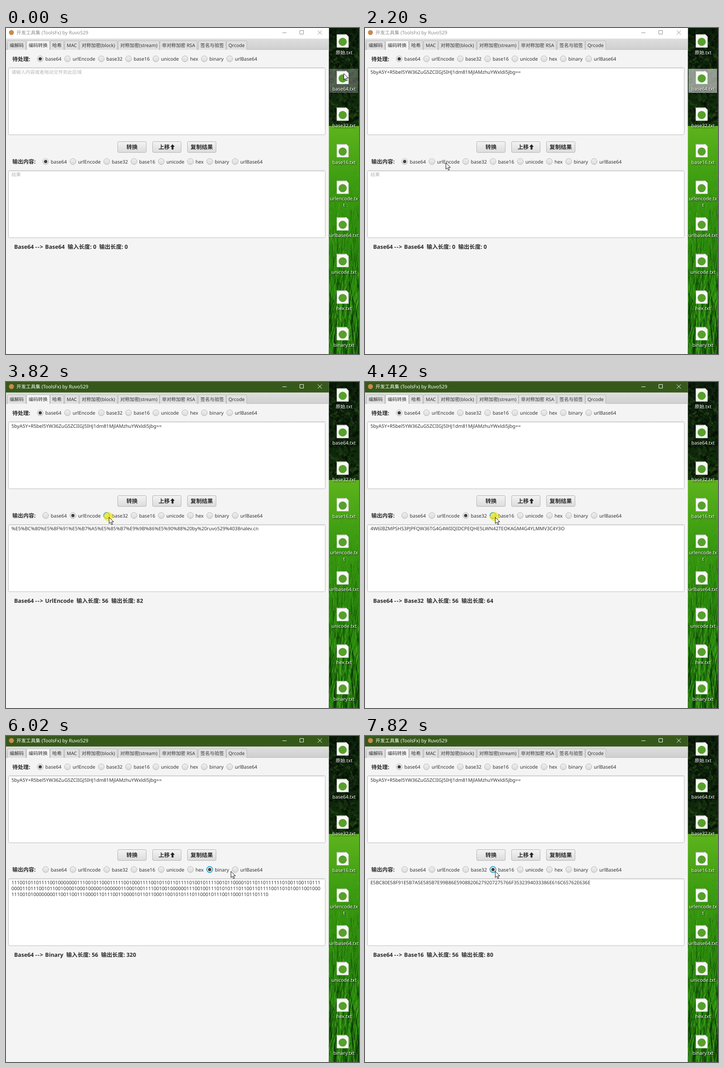
An HTML page with a canvas that plays this animation: 779 px wide and 719 px high, repeating every 8000 ms.

```html
<!DOCTYPE html>
<html lang="zh">
<head>
<meta charset="utf-8">
<title>开发工具集</title>
<style>
html, body { margin: 0; width: 100%; height: 100%; overflow: hidden; background: #f4f4f4; }
canvas, svg { position: absolute; left: 0; top: 0; display: block; }
text {
  font: 10.56px "Noto Sans", "Open Sans", "Noto Sans CJK SC", "Noto Sans CJK", sans-serif;
  fill: #333; white-space: pre; text-rendering: geometricPrecision;
}
.tab { font-size: 10.4px; }
.bold { font-size: 12.35px; font-weight: 700; fill: #2b2b2b; }
.cap { font-size: 12px; }
.mid { text-anchor: middle; }
.hint { font-size: 10.35px; fill: #b4b4b4; }
.icon { font-size: 10.5px; fill: #fff; text-anchor: middle; filter: drop-shadow(1px 1px 1px #000); }
#bar { fill: #fff; }
#title { fill: #8c8c8c; }
#ctl { fill: none; stroke: #8c8c8c; }
.active #bar { fill: #36591b; }
.active #title { fill: #fff; }
.active #ctl { stroke: #fff; }
</style>
</head>
<body>
<canvas id="wall" width="779" height="719"></canvas>
<svg id="app" width="779" height="719" viewBox="0 0 779 719">
  <defs>
    <linearGradient id="btn" x2="0" y2="1"><stop stop-color="#f3f3f3"/><stop offset="1" stop-color="#dcdcdc"/></linearGradient>
    <linearGradient id="dot" x2="0" y2="1"><stop stop-color="#f0f0f0"/><stop offset="1" stop-color="#dadada"/></linearGradient>
    <linearGradient id="tabs" x2="0" y2="1"><stop stop-color="#dedede"/><stop offset="1" stop-color="#cfcfcf"/></linearGradient>
    <linearGradient id="inset" x2="0" y2="1"><stop stop-color="#e4e4e4"/><stop offset="1" stop-color="#fff"/></linearGradient>
  </defs>
  <text id="probe" visibility="hidden"></text>
  <g id="ui"></g>
  <circle id="glow" r="10" fill="#f2e500" fill-opacity=".68"/>
  <path id="cursor" d="M.5 .5V14.2L3.7 11.2L6 16.6L8.3 15.6L6 10.4H10.4Z" fill="#fff" stroke="#111"/>
</svg>
<script>
const $ = id => document.getElementById(id);
const LOOP = 8000, DROP = 800;

const names = ['base64', 'urlEncode', 'base32', 'base16', 'unicode', 'hex', 'binary', 'urlBase64'];
const labels = ['Base64', 'UrlEncode', 'Base32', 'Base16', 'Unicode', 'Hex', 'Binary', 'Base64Safe'];
const tabNames = ['编解码', '编码转换', '哈希', 'MAC', '对称加密(block)', '对称加密(stream)',
  '非对称加密 RSA', '签名与验签', 'Qrcode'];
const files = ['原始.txt', 'base64.txt', 'base32.txt', 'base16.txt', 'urlencode.tx|t',
  'urlbase64.txt', 'unicode.txt', 'hex.txt', 'binary.txt'];

// Encoders
const plain = '开发工具集合 by ruvo529@38nalev.cn';
const bytes = [...new TextEncoder().encode(plain)];
const join = (radix, pad) => bytes.map(b => b.toString(radix).padStart(pad, '0')).join('');
const bits = join(2, 8), hex = join(16, 2);
const base64 = btoa(String.fromCharCode(...bytes));
const base32 = bits.match(/.{5}/g).map(b => 'ABCDEFGHIJKLMNOPQRSTUVWXYZ234567'[parseInt(b, 2)]).join('');
const unicode = [...plain].map(c => '\\u' + c.charCodeAt(0).toString(16)).join('');
const outputs = [base64, encodeURIComponent(plain), base32, hex.toUpperCase(),
  unicode, hex, bits, base64.replace(/\+/g, '-').replace(/\//g, '_')];

// Layout
function width(s, cls = '') {
  $('probe').setAttribute('class', cls);
  $('probe').textContent = s;
  return $('probe').getComputedTextLength();
}
// Left edge of each item in a row of texts
function flow(list, x, gap, cls) {
  return list.map(s => {
    const left = x;
    x += width(s, cls) + gap;
    return left;
  });
}
const radioX = flow(names, 75.5, 24.7);
const tabX = flow(tabNames, 3, 10.8, 'tab');

const text = (x, y, s, cls = '', id = '') => `<text x="${x}" y="${y}" class="${cls}" id="${id}">${s}</text>`;
const rect = (x, y, w, h, attrs) => `<rect x="${x}" y="${y}" width="${w}" height="${h}" ${attrs}/>`;

const tab = (s, i) => {
  const x = Math.round(tabX[i]), w = Math.round(width(s, 'tab') + 9);
  return `<path d="M${x + .5} 48V30q0-2 2-2h${w - 4}q2 0 2 2V48" fill="${i === 1 ? '#f4f4f4' : '#e0e0e0'}" stroke="#b9b9b9"/>`
    + text(x + 5, 42, s, 'tab');
};

const radios = (row, shift, y) => names.map((s, i) => {
  const x = radioX[i] + shift;
  return `<circle id="${row}ring${i}" cx="${x}" cy="${y}" r="6.6" fill="url(#dot)" stroke="#b5b5b5"/>`
    + `<circle id="${row}dot${i}" cx="${x}" cy="${y}" r="3.5" fill="#3c3f3c"/>`
    + text(x + 11.3, y + 4, s);
}).join('');

const area = y => rect(5.5, y + .5, 699, 148, 'rx="2" fill="#fff" stroke="#bdbdbd"')
  + rect(6, y + 1, 698, 3, 'fill="url(#inset)"');

const button = (s, i) => {
  const x = 246 + i * 77;
  return rect(x + .5, 250.5, 63, 24, 'rx="2.5" fill="url(#btn)" stroke="#b3b3b3"')
    + text(x + (i === 1 ? 26 : 32), 267, s, 'bold mid');
};

const file = (s, i) => {
  const y = i * 80.7;
  return `<path d="M730 ${y + 14}H751L756 ${y + 19}V${y + 43}H730Z" fill="#f7f8f4" stroke="#aeb5a6" stroke-width=".7"/>`
    + `<path d="M732 ${y + 14.5}H750" stroke="#777" stroke-width="2" stroke-dasharray="1 2"/>`
    + `<circle cx="743" cy="${y + 30.5}" r="9" fill="#57a02c"/>`
    + s.split('|').map((line, k) => text(746, y + 57.5 + k * 14, line, 'icon')).join('');
};

$('ui').innerHTML = rect(0, 0, 712.5, 719, 'fill="#f4f4f4"')
  + rect(0, 0, 712.5, 23.5, 'id="bar"')
  + '<circle cx="12" cy="10" r="5.5" fill="#c98a4b"/>'
  + text(23, 13.7, '开发工具集 (ToolsFx) by Ruvo529', '', 'title')
  + '<path id="ctl" d="M610 10.5h9M648.5 5.5h8v8h-8zM688 5.5l9 9M697 5.5l-9 9"/>'
  + rect(0, 23.5, 712.5, 24.5, 'fill="url(#tabs)"')
  + '<path d="M0 47.5H712" stroke="#b9b9b9"/>'
  + tabNames.map(tab).join('')
  + text(14, 72.5, '待处理:', 'bold cap') + radios('a', 0, 68)
  + area(87) + area(314)
  + ['转换', '上移', '复制结果'].map(button).join('')
  + '<path d="M367.5 256.5l5 5.5h-3v6h-4v-6h-3z" fill="#222"/>'
  + text(14, 299, '输出内容:', 'bold cap') + radios('b', 12, 294.5)
  + text(12, 100.5, '', '', 'input')
  + [0, 1, 2].map(i => text(12, 327 + i * 13, '', '', 'out' + i)).join('')
  + text(18, 486.5, 'Base64 <tspan letter-spacing="1.2">--&gt;</tspan> <tspan id="status"></tspan>', 'bold')
  + rect(714.5, 90.5, 62, 52, 'id="tile" fill="#fff" stroke="#fff"')
  + files.map(file).join('');

// Wallpaper: dark trees above a meadow
function paintWall() {
  const c = $('wall').getContext('2d'), left = 712, horizon = 216;
  let seed = 11;
  const rnd = () => (seed = seed * 16807 % 2147483647) / 2147483647;
  const fill = (y, h, ...colors) => {
    const g = c.createLinearGradient(0, y, 0, y + h);
    colors.forEach((col, i) => g.addColorStop(i / (colors.length - 1), col));
    c.fillStyle = g;
    c.fillRect(left, y, 67, h);
  };
  fill(0, horizon, '#0a1c0a', '#0d220b', '#12300c');
  fill(horizon, 503, '#5db31c', '#3c9c10', '#2b880c', '#237a0b', '#1c680a');
  c.beginPath();
  c.rect(left, 0, 67, 719);
  c.clip();
  for (let i = 0; i < 420; i++) {
    const y = rnd() * (horizon - 8), light = Math.sin(y / 40) ** 2;
    c.fillStyle = rnd() < .55 ? 'rgba(2,8,2,.5)' : `rgba(50,90,28,${.15 + light * .25})`;
    c.beginPath();
    c.ellipse(left + rnd() * 67, y, 1 + rnd() * 5, 1 + rnd() * 2, rnd() * 3, 0, 7);
    c.fill();
  }
  for (let i = 0; i < 900; i++) {
    const depth = Math.sqrt(rnd()), y = horizon + 6 + depth * 530, x = left - 7 + rnd() * 80;
    const len = 3 + depth * depth * 85 * (.4 + rnd()), lean = (rnd() - .4) * len * .5;
    const kind = rnd();
    c.strokeStyle = kind < .48 ? `rgba(8,54,4,${.1 + depth * .5})`
      : kind < .85 ? 'rgba(54,166,20,.5)' : 'rgba(112,200,56,.4)';
    c.lineWidth = .6 + depth * 1.8 * rnd();
    c.beginPath();
    c.moveTo(x, y);
    c.quadraticCurveTo(x + lean * .2, y - len * .6, x + lean, Math.max(horizon + 3, y - len));
    c.stroke();
  }
}

// Radio clicks: press time, index, how long the button is held
const clicks = [[2600, 1, 200], [3820, 2, 200], [4420, 3, 200], [4820, 4, 200], [5420, 5, 0],
  [5620, 6, 200], [6220, 7, 200], [7220, 1, 0], [7420, 2, 200], [7820, 3, 0]]
  .map(([down, index, hold]) => ({ down, index, up: down + hold }));

// Pointer moves: drag the file in, drop it, then travel from radio to radio
const move = (from, to, x, y) => ({ from, to, x, y });
const moves = [move(0, DROP, 212, 120), move(1000, 1200, 221, 141), move(1600, 2200, 178, 297),
  ...clicks.map((k, i) => move(i ? clicks[i - 1].down : 2400, k.down, radioX[k.index] + 17, 297.5))];

const ease = p => p * p * (3 - 2 * p);

function pointer(t) {
  let x = 745, y = 100;
  for (const m of moves) {
    const p = ease(Math.min(1, Math.max(0, (t - m.from) / (m.to - m.from))));
    x += (m.x - x) * p;
    y += (m.y - y) * p;
  }
  return [Math.round(x), Math.round(y)];
}

function snap(t) {
  const slip = t < 3820 ? 0 : 20;
  const s = Math.floor((t - slip) / 200) * 200 + slip;
  return s === 3800 ? 3600 : s;
}

function choose(row, sel, focus) {
  names.forEach((_, i) => {
    $(row + 'dot' + i).style.display = i === sel ? '' : 'none';
    const ring = $(row + 'ring' + i);
    ring.setAttribute('stroke', i === focus ? '#2a9fcb' : '#b5b5b5');
    ring.setAttribute('stroke-width', i === focus ? 1.6 : 1);
  });
}

function render(t) {
  const [x, y] = pointer(t);
  const press = clicks.filter(k => k.down <= t).pop();
  const pick = clicks.filter(k => k.up <= t).pop();
  const sel = pick ? pick.index : 0;
  const loaded = t >= DROP;

  $('app').classList.toggle('active', !!press);
  $('cursor').setAttribute('transform', `translate(${x} ${y})`);
  $('glow').setAttribute('cx', x - 1);
  $('glow').setAttribute('cy', y - 1);
  $('glow').style.display = press && t < press.up ? '' : 'none';
  $('tile').style.opacity = press ? 0 : t < 200 ? .27 : .55;

  $('input').textContent = loaded ? base64 : '请输入内容或者拖动文件到此区域';
  $('input').setAttribute('class', loaded ? '' : 'hint');
  choose('b', sel, press ? press.index : -1);

  const out = pick ? outputs[sel] : '结果';
  const n = Math.floor(out.length * 684 / width(out));
  for (let i = 0; i < 3; i++) $('out' + i).textContent = out.slice(i * n, i * n + n);
  $('out0').setAttribute('class', pick ? '' : 'hint');
  $('status').textContent = `${labels[sel]}  输入长度: ${pick ? base64.length : 0}  输出长度: ${pick ? out.length : 0}`;
}

paintWall();
choose('a', 0, -1);
const start = performance.now();
let shown = -1;
function tick() {
  const t = snap((performance.now() - start) % LOOP);
  if (t !== shown) render(shown = t);
  requestAnimationFrame(tick);
}
tick();
</script>
</body>
</html>
```
